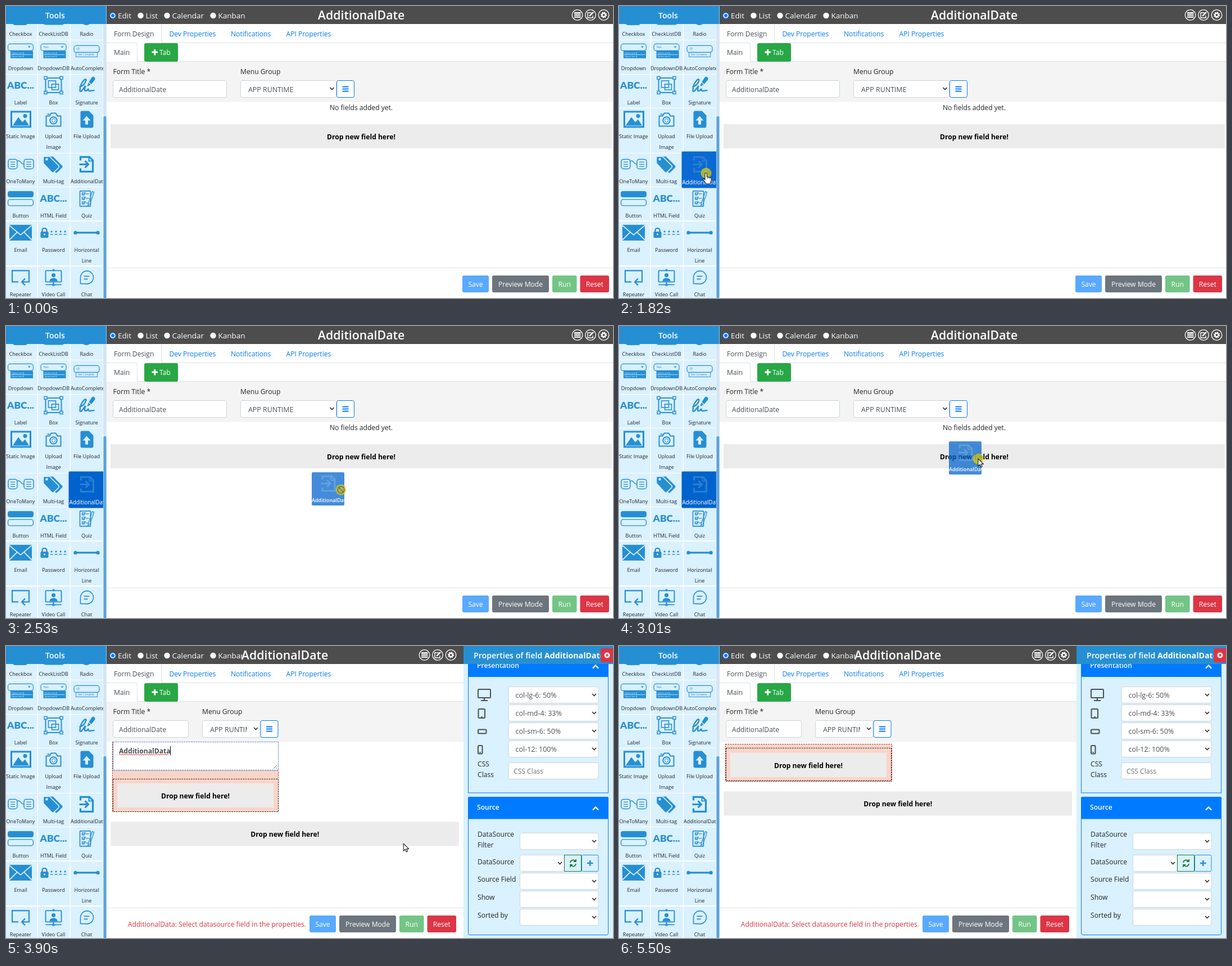
An HTML page that plays this animation: 1080x519 px, repeating every 5.63 s.

```html
<!DOCTYPE html>
<html lang="en">
<head>
<meta charset="utf-8">
<title>Form designer</title>
<style>
html, body { margin: 0; width: 100%; height: 100%; overflow: hidden; background: #fff; }
svg { display: block; width: 100vw; height: 100vh; font-family: "Open Sans", "Noto Sans", sans-serif; font-size: 12.1px; font-variant-ligatures: none; }
</style>
</head>
<body>
<svg id="stage" viewBox="0 0 1080 519" preserveAspectRatio="none"></svg>
<script>
const BLUE = '#268fd3', PALE = '#daf1ff', PRIMARY = '#007bff', INK = '#212529', GREY = '#495057', LINE = '#dee2e6';

// Drawing helpers
const rect = (x, y, w, h, fill, more = '') => `<rect x="${x}" y="${y}" width="${w}" height="${h}" fill="${fill}" ${more}/>`;
const text = (x, y, s, fill = INK, more = '') => `<text x="${x}" y="${y}" fill="${fill}" ${more}>${s}</text>`;
const mid = (x, y, s, fill, more = '') => text(x, y, s, fill, 'text-anchor="middle" ' + more);
const line = (d, color, w = 1, more = '') => `<path d="${d}" fill="none" stroke="${color}" stroke-width="${w}" ${more}/>`;
const fill = (d, color, more = '') => `<path d="${d}" fill="${color}" ${more}/>`;
const dot = (x, y, r, color, more = '') => `<circle cx="${x}" cy="${y}" r="${r}" fill="${color}" ${more}/>`;
const at = (x, y, s) => `<g transform="translate(${x} ${y})">${s}</g>`;
const group = (id, s) => `<g id="${id}">${s}</g>`;
const clip = (id, x, y, w, h) => `<clipPath id="${id}">${rect(x, y, w, h, '#000')}</clipPath>`;
const clipped = (id, s) => `<g clip-path="url(#${id})">${s}</g>`;
const size = px => `font-size="${px}" `;
const bold = 'font-weight="700" ', semi = 'font-weight="600" ', small = size(9.05);

const field = (x, y, w, h = 30) => rect(x + .5, y + .5, w - 1, h - 1, '#fff', 'rx="3" stroke="#ced4da"');
const arrowDown = (x, y) => line(`M${x - 3.5} ${y - 2}l3.5 3.6 3.5-3.6`, '#333', 1.7);
const select = (x, y, w, s = '') => field(x, y, w) + text(x + 13, y + 19.5, s, GREY, size(12.5)) + arrowDown(x + w - 8, y + 15);
const button = (x, w, color, s) => rect(x, 479, w, 30, color, 'rx="3"') + mid(x + w / 2, 499, s, '#fff');
const dropBar = (x, y, w) => rect(x, y, w, 43, '#ececec') + mid(x + w / 2, y + 26.5, 'Drop new field here!', '#000', bold);
const dashed = (x, y, w, h, bg, color) => rect(x + .5, y + .5, w - 1, h - 1, bg, `stroke="${color}" stroke-dasharray="2.6 1.6"`);

// Tool icons, centred on the origin
const box = (x, y, w, h, rx = 2, sw = 1.8) => rect(x, y, w, h, 'none', `rx="${rx}" stroke="${BLUE}" stroke-width="${sw}"`);
const combo = s => box(-22.5, -13, 45, 12, 4, 1.2) + rect(-18, -.5, 40, 13, BLUE) + line('M-17 6H20', PALE, .8) +
  text(-18, -5, s, BLUE, size(5)) + fill('M13-9h5l-2.5 3z', BLUE) +
  text(-16, 4.2, 'Option one A', PALE, size(3.6)) + text(-16, 10.6, 'Option two B', PALE, size(3.6));
const fileArrow = color => line('M-11-7V-13H5L11-7V13H-11V7', color, 3.2) + line('M4-13V-6H11', color, 2) +
  line('M-13 0H2M-3-6L3 0-3 6', color, 3);
const tag = 'M-17-12q0-2 2-2h9l16 16q2 2 0 4l-8 8q-2 2-4 0L-17-2z';
const icons = {
  dropdown: combo(''),
  dropdownDb: combo('Text'),
  auto: box(-22.5, -10, 45, 12, 4, 1.2) + rect(-19, 2, 38, 8, 'none', `stroke="${BLUE}"`) +
    text(-18, -1, 'IT', BLUE, size(7)) + text(-16, 8, 'Text Complete', BLUE, size(4.4)),
  abc: mid(0, 6, 'ABC...', BLUE, size(17.4) + 'font-family="Lato, sans-serif" font-weight="900"'),
  box: box(-14, -13, 28, 26, 0, 2) + box(-9, -8, 13, 12, 0, 1.6) + box(-3, -2, 12, 10, 0, 1.6) +
    [[-14, -13], [14, -13], [-14, 13], [14, 13]].map(([x, y]) => rect(x - 2.5, y - 2.5, 5, 5, PALE, `stroke="${BLUE}" stroke-width="1.5"`)).join(''),
  sign: line('M-13 3q9-2 12-12q0-3-3-1q-8 8-8 19q0 4 4 0l6-8q-3 9 0 9t5-4q0 5 3 4l8-1', BLUE, 2.4) +
    fill('M1 2L3-5 7-1zM4-6L9-14q3-3 5 0q2 2 0 5L8-2z', BLUE),
  image: rect(-18, -15, 37, 30, BLUE) + rect(-15, -12, 31, 24, PALE) + fill('M-14 11L-4-4 3 5 8 0 15 11z', BLUE) + dot(8, -6, 3.5, BLUE),
  camera: line('M-13-6h6l3-5H4l3 5h6V12H-13z', BLUE, 2, 'stroke-linejoin="round"') + dot(0, 2, 6.2, 'none', `stroke="${BLUE}" stroke-width="2"`) +
    dot(0, 2, 3, 'none', `stroke="${BLUE}"`) + rect(-11, -10, 4, 2, BLUE),
  upload: fill('M-11-12q0-3 3-3H4l8 8V12q0 3-3 3H-8q-3 0-3-3z', BLUE) + fill('M0-6L7 2H2.5V9h-5V2H-7z', PALE),
  many: box(-22, -9, 16, 17, 4, 1.5) + box(6, -9, 17, 17, 4, 1.5) + line('M-18-4h8M-18 0h8M-18 4h8M10-4h9M10 0h9M10 4h9', BLUE, 1.4) +
    line('M-6-5q3-3 6 1t6 4', BLUE, 1.5),
  tags: at(5, 0, fill(tag, BLUE)) + at(-1, 0, fill(tag, BLUE, `stroke="${PALE}" stroke-width="1.5"`)) + dot(-12, -9, 2.2, PALE),
  file: fileArrow(BLUE),
  button: rect(-23, -13, 46, 11, BLUE, 'rx="4"') + box(-22.5, 2, 45, 11, 4, 1.4),
  quiz: box(-12, -13, 19, 27, 1, 1.7) + [-8, 0, 8].map(y => box(-8, y - 2, 4, 4, 0, 1.2) + line(`M-2 ${y}H4M-7 ${y}l2 2 3-5`, BLUE, 1.2)).join('') +
    line('M3 9L10-12l3 1L6 10l-4 3z', BLUE, 1.3),
  mail: rect(-20, -14, 40, 28, BLUE) + line('M-20-13L0 4 20-13M-20 13L-6-1M20 13L6-1', PALE, 1.7),
  lock: rect(-23, -2, 14, 11, BLUE, 'rx="1.5"') + line('M-20-1V-4a4 4 0 0 1 8 0v3', BLUE, 2.4) + dot(-16, 3, 1.6, PALE) +
    [-3, 5, 13, 21].map(x => line(`M${x - 3} 3h5`, BLUE, 1.4) + dot(x - .5, -2, 1.6, BLUE)).join(''),
  rule: line('M-20 0H20', BLUE, 3.4) + dot(-20, 0, 3.2, BLUE) + dot(20, 0, 3.2, BLUE),
  repeat: line('M-4 8H-15V-12H15V8H3', BLUE, 2.2) + line('M8 2L2 8l6 6', BLUE, 2.2),
  video: box(-14, -12, 28, 20, 1, 1.9) + dot(0, -4, 3.5, BLUE) + fill('M-7 7q0-6 7-6t7 6z', BLUE) + line('M0 8v5M-14 13H14', BLUE, 1.8) +
    dot(0, 13, 2.3, BLUE) + dot(0, -13, 2, BLUE),
  chat: line('M-11 11V0A11.5 11.5 0 1 1 0 11.5z', BLUE, 1.6) + line('M-5-2H5M-5 3H2', BLUE, 1.6)
};

// Top, height, label baseline, then label and icon of each cell
const rows = [
  [31, 29, 53, 'Checkbox', 'CheckListDB', 'Radio'],
  [61, 60, 114, 'Dropdown dropdown', 'DropdownDB dropdownDb', 'AutoComplete auto'],
  [122, 59, 174.5, 'Label abc', 'Box box', 'Signature sign'],
  [182, 79, 235, 'Static_Image image', 'Upload|Image camera', 'File_Upload upload'],
  [262, 59, 315, 'OneToMany many', 'Multi-tag tags', 'AdditionalDate file'],
  [322, 59, 375.5, 'Button button', 'HTML_Field abc', 'Quiz quiz'],
  [383, 78, 436.5, 'Email mail', 'Password lock', 'Horizontal|Line rule'],
  [463, 58, 516, 'Repeater repeat', 'Video_Call video', 'Chat chat']
];

function toolGrid() {
  let out = rect(0, 32, 173, 487, '#fff');
  for (const [y, h, base, ...cells] of rows) cells.forEach((cell, i) => {
    const [name, icon] = cell.split(' '), cx = [26, 84.5, 143.5][i];
    out += rect([0, 57, 115][i], y, [55.5, 56.5, 57.5][i], h, PALE);
    if (icon) out += at(cx, base - 33.6, icons[icon]);
    name.replace('_', ' ').split('|').forEach((s, n) => {
      out += /^(Auto|Addit)/.test(s) ? text(115, base, s, INK, small) : mid(cx, base + n * 19, s, INK, small);
    });
  });
  return out + rect(12, 24, 26, 10, BLUE, 'rx="4"') + rect(67, 24, 36, 9.5, BLUE, 'rx="3"') + dot(143, 24, 10, BLUE);
}

const tile = (w, h, color) => rect(0, 0, w, h, color, 'rx="2"') + at(w / 2 + 1, h / 2 - 9.5, fileArrow('#2b7fcd'));

const header = () => {
  const radios = [[190, 'Edit'], [239.5, 'List'], [286.5, 'Calendar'], [368.5, 'Kanban']];
  return rect(179, 0, 901, 32, '#4d4d4d') +
    radios.map(([x, s], i) => dot(x, 17, 5.2, '#fff', i ? '' : 'stroke="#0075ff" stroke-width="1.2"') +
      (i ? '' : dot(x, 17, 3, '#0075ff')) + text(x + 9, 22, s, '#fff', size(13.5))).join('');
};
const ring = (x, s) => at(x, 16, dot(0, 0, 9.3, 'none', 'stroke="#fff" stroke-width="1.3"') + s);
const topIcons = ring(1016.5, line('M-5.5-4H6M-5.5-1.3H6M-5.5 1.4H6M-5.5 4.1H6', '#fff', 1.8)) +
  ring(1040, line('M2-4H-5V5H4V1', '#fff', 1.4) + line('M-2 2L5-5', '#fff', 2.4)) +
  ring(1063.5, dot(0, 0, 3.2, 'none', 'stroke="#fff" stroke-width="2.4"') + dot(0, 0, 4.8, 'none', 'stroke="#fff" stroke-width="1.8" stroke-dasharray="1.9 1.87"'));
const footer = button(812, 47, '#59a9ff', 'Save') + button(865, 101, '#6c757d', 'Preview Mode') +
  button(972, 43.5, '#73c586', 'Run') + button(1021.5, 51.5, '#dc3545', 'Reset');
const title = x => mid(x, 24.2, 'AdditionalDate', '#fff', size(21.3) + semi);

const tabs = rect(179, 32, 901, 487, '#fff') + line('M276.5 32V65.5H1080M179 65.5H230M233.5 98.5V70q0-4-4-4M233 98.5H1080', LINE) +
  text(192, 53.5, 'Form Design', GREY) + text(290.5, 53.5, 'Dev Properties', PRIMARY) +
  text(400, 53.5, 'Notifications', PRIMARY) + text(498.5, 53.5, 'API Properties', PRIMARY) +
  text(192, 87, 'Main', GREY) + rect(246, 66, 60, 33, '#28a745', 'rx="3"') + line('M259.5 82H270M264.7 77V87.5', '#fff', 3) + text(273, 87, 'Tab', '#fff') +
  rect(179, 99, 901, 71.5, '#f4f4f4') + line('M179 465.5H1080', LINE) + text(190.5, 121, 'Form Title *');

const formTop = (w, x, selW, clipId) => field(190, 132, w, 31) + text(201, 153, 'AdditionalDate', GREY) + text(x, 121, 'Menu Group') +
  field(x, 132, selW, 31) + clipped(clipId, text(x + 14, 153, 'APP RUNTIME', GREY, size(12.4))) + arrowDown(x + selW - 8, 147) +
  rect(x + selW + .5, 132.5, 31, 30, '#fff', `rx="3" stroke="${PRIMARY}"`) +
  line(`M${x + selW + 10.5} 143.5h11m-11 4h11m-11 4h11`, PRIMARY, 1.8);

const wideView = title(632) + topIcons + formTop(203, 417, 171, 'menuLong') + mid(632, 185, 'No fields added yet.') + dropBar(186, 210, 892) + footer;

const chevronUp = y => line(`M1044 ${y + 2.5}l5-5 5 5`, '#fff', 2.4);
const device = (x, y, w, h) => rect(x, y, w, h, 'none', `rx="1.5" stroke="${GREY}" stroke-width="2"`);
const labels = [[214, 'CSS'], [233, 'Class'], [339, 'DataSource'], [358, 'Filter'], [388, 'DataSource'], [419, 'Source Field'], [451, 'Show'], [483, 'Sorted by']];
const panel = rect(814, 32, 266, 487, PALE) +
  rect(822.5, 30, 249, 231, PALE, `stroke="${PRIMARY}"`) + rect(822, 30, 250, 25, PRIMARY) + text(838, 39, 'Presentation', '#fff', semi) + chevronUp(37) +
  rect(822.5, 268.5, 249, 245, PALE, `rx="3" stroke="${PRIMARY}"`) + rect(822, 268, 250, 39.5, PRIMARY, 'rx="2"') + text(838, 291, 'Source', '#fff', semi) + chevronUp(289) +
  ['col-lg-6: 50%', 'col-md-4: 33%', 'col-sm-6: 50%', 'col-12: 100%'].map((s, i) => select(893.5, 72 + i * 32, 161, s)).join('') +
  device(840, 77, 22, 15) + line('M851 92v4M845 97h12', GREY, 2.2) +
  device(840.5, 112, 11.5, 16) + line('M845 126h3', GREY, 1.5) + device(840, 148.5, 14.5, 7) + device(840, 177, 7.5, 14.5) + line('M842 189h3', GREY, 1.5) +
  labels.map(([y, s]) => text(839, y, s)).join('') + field(893.5, 207, 161) + text(903, 226.5, 'CSS Class', '#6c757d') +
  [332, 403, 435, 467].map(y => select(914, y, 140.5)).join('') + select(914, 371, 79.5) +
  rect(993.5, 371.5, 30, 29, PALE, 'stroke="#1e7e34"') + rect(1024.5, 371.5, 29.5, 29, PALE, `rx="2" stroke="${BLUE}"`) +
  line('M1004 385a5 5 0 0 1 9-2.5M1014 387a5 5 0 0 1-9 2.5M1014 379v4h-4M1004 393v-4h4', '#1e7e34', 1.8) +
  line('M1034 386h10.5M1039.2 381v10', BLUE, 2.6) +
  rect(814, 0, 266, 32, BLUE) +
  clipped('panelTitle', text(832, 22, `Properties of field <tspan ${bold}>AdditionalDate</tspan>`, '#fff', size(14.2) + semi)) +
  rect(1058, 4, 24, 25, '#dc3545', 'rx="3"') + dot(1069.5, 16.5, 5, '#fff') + line('M1067.5 14.5l4 4m0-4l-4 4', '#dc3545', 1.5);

const squiggle = 'M201 194' + 'l2-2 2 2'.repeat(22);
const fieldBlock = dashed(189, 170, 296, 125, '#f9d5c8', '#a33') + dashed(190, 170, 295, 50, '#fff', '#222') +
  group('focus', dashed(190, 170, 295, 51, '#fff', '#5f8fe6') + line('M190 221.5H485', '#a9b7cf', 1.2) + line(squiggle, '#e33')) +
  text(201, 190.5, 'AdditionalData', GREY, bold) + line('M292.5 178V194', '#000') + line('M476 218l6-6m-2 6l2-2', '#777') +
  dashed(190, 236, 295, 59, '#f9d5c8', '#222') + dropBar(198, 244, 278) + dropBar(186.5, 312.5, 619.5);
const emptyBlock = dashed(189, 174, 297, 67, '#f9d5c8', '#b22') + dashed(190, 181, 295, 59, '#f9d5c8', '#222') +
  dropBar(198, 190, 278) + dropBar(186.5, 258.5, 619.5);
const splitView = rect(420, 0, 153, 32, '#4d4d4d') + title(496) + at(-272, 0, topIcons + footer) + formTop(135, 349, 103.5, 'menuShort') +
  text(534, 499, 'AdditionalData: Select datasource field in the properties.', '#d9363e', 'text-anchor="end"') +
  group('fieldBlock', fieldBlock) + group('emptyBlock', emptyBlock) + panel;

const outline = 'stroke="#222" stroke-width="1.1" stroke-linejoin="round"';
const cursor = dot(0, 0, 9.5, '#e6d200', 'id="press" opacity=".7"') +
  group('arrow', fill('M0 0V13l3.1-2.8 2 4.6 2.2-1-2-4.4h4.2z', '#fff', outline)) +
  group('hand', fill('M-2 1.5a1.7 1.7 0 0 1 3.4 0V6.5l6 1.5q2 .6 2 2.6l-1 5q-.4 2-1.5 3.4H0q-1-2-5-7q-1-2 1-2l2 2z', '#fff', outline) +
    line('M3 10v-3M6 10.5v-2.5', '#222', .8)) +
  group('noDrop', dot(0, 0, 6, 'none', 'stroke="#666" stroke-width="1.6"') + line('M-4-4L4 4', '#666', 1.6));

const stage = document.getElementById('stage');
stage.innerHTML = '<defs>' + clip('side', 0, 32, 173, 487) + clip('panelTitle', 814, 0, 244, 32) + clip('menuShort', 350, 132, 79, 31) +
  clip('menuLong', 418, 132, 150, 31) + clip('tileBox', 0, 0, 58, 59) + '</defs>' +
  clipped('side', toolGrid() +
    group('hover', at(111.5, 258.5, tile(64, 65, '#0b69d3')) + text(112.5, 317, 'AdditionalDate', '#fff', size(9.9))) +
    group('active', at(115, 262, tile(57.5, 59, '#0062cc')) + text(115, 315, 'AdditionalDate', '#fff', small))) +
  rect(173, 32, 6, 487, '#d5e6f2') + rect(173.5, 196, 5, 323, '#5aa3dc', 'rx="2"') +
  rect(0, 0, 178.5, 32, BLUE) + mid(87.5, 22, 'Tools', '#fff', size(14) + semi) +
  tabs + header() + group('wide', wideView) + group('split', splitView) +
  group('ghost', clipped('tileBox', tile(58, 59, '#0062cc') + text(0, 52.5, 'AdditionalDate', '#fff', small + semi))) +
  group('cursor', cursor);

const el = {};
stage.querySelectorAll('[id]').forEach(n => el[n.id] = n);
el.ghost.setAttribute('opacity', .73);
const hoverFill = el.hover.querySelector('rect');
const show = (id, on) => el[id].setAttribute('display', on ? 'inline' : 'none');
const move = (id, x, y) => el[id].setAttribute('transform', `translate(${x} ${y})`);

const LOOP = 5630;
// The picture advances in bursts: start, end, steps
const bursts = [[390, 930, 8], [990, 1480, 8], [1680, 2200, 9], [2260, 2800, 9], [2870, 3010, 3], [3270, 3270, 1], [3470, 4020, 9], [4090, 4570, 8], [5500, 5500, 1]];
const ticks = [0];
for (const [a, b, n] of bursts) for (let i = 0; i < n; i++) ticks.push(n > 1 ? a + (b - a) * i / (n - 1) : a);

// Pointer path: time, x, y
const path = [[390, 985, 495], [660, 575, 393], [930, 311, 340], [990, 265, 331], [1060, 219, 321], [1200, 178, 307], [1340, 160, 299], [1480, 155, 297],
  [1820, 155, 297], [1890, 172, 304], [2020, 270, 335], [2200, 430, 351], [2530, 596, 291], [2800, 631, 255], [3010, 639, 236], [3270, 639, 236],
  [3470, 633, 244], [4020, 732, 387], [4570, 992, 518]];

function pointer(t) {
  const i = path.findIndex(p => p[0] >= t);
  if (i < 1) return path[i < 0 ? path.length - 1 : 0].slice(1);
  const [a, x, y] = path[i - 1], [b, u, v] = path[i], k = (t - a) / (b - a);
  return [x + (u - x) * k, y + (v - y) * k];
}

function draw(time) {
  const t = ticks.filter(s => s <= time + .01).pop();
  const [x, y] = pointer(t);
  const dropped = t >= 3470, dragging = t > 1850 && t < 3270;
  const over = t >= 990 && x < 173;
  show('wide', !dropped);
  show('split', dropped);
  show('fieldBlock', t < 5500);
  show('emptyBlock', t >= 5500);
  show('focus', t > 3500);
  show('hover', !dropped && (over || t > 1480));
  show('active', t === 3470);
  hoverFill.setAttribute('fill', t > 1850 ? '#0062cc' : '#0b69d3');

  const noDrop = dragging && y >= 253;
  const hand = !dragging && (over || (t >= 3270 && t <= 3470));
  show('cursor', t >= 390 && t < 4570);
  move('cursor', x, y);
  show('noDrop', noDrop);
  show('hand', hand);
  show('arrow', !noDrop && !hand);
  show('press', t >= 1680 && t < 3270);

  show('ghost', dragging);
  move('ghost', x - 52, y - 31);
}

function frame(now) {
  draw(now % LOOP);
  requestAnimationFrame(frame);
}
draw(0);
requestAnimationFrame(frame);
</script>
</body>
</html>
```
